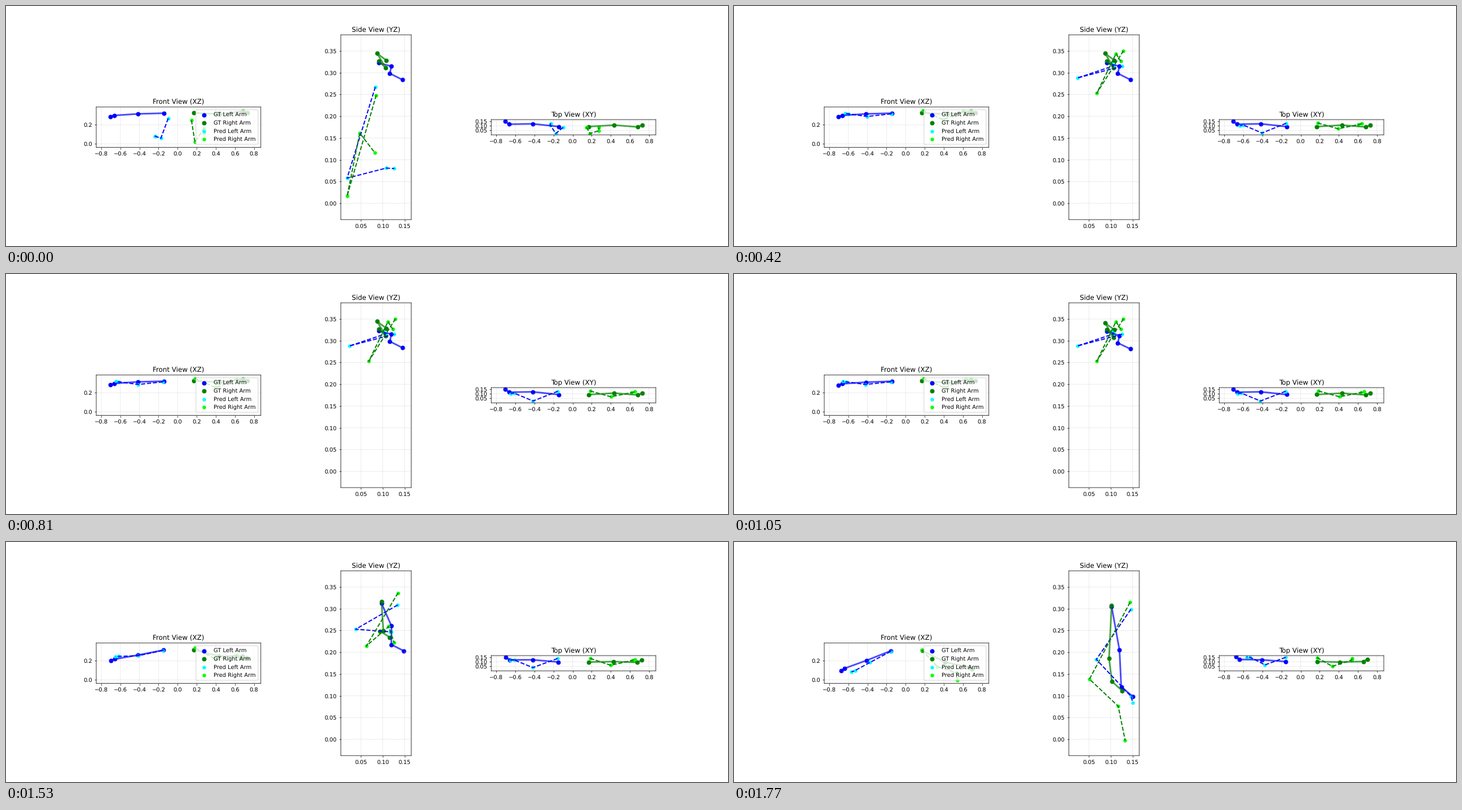
A matplotlib script that plays this animation: 1280 px wide and 427 px high, repeating every 1800 ms.

```python
import numpy as np
import matplotlib.pyplot as plt
from matplotlib.animation import FuncAnimation
from matplotlib.ticker import MultipleLocator

FRAMES, INTERVAL = 60, 30
DPI = 1280 / 18
SETTLE = 0.35   # share of the cold-start error left after each step
CREEP = 0.0018  # outward growth of the predicted reach per step
AXIS_LAG = np.array([1.75, 1, 1])  # an arm that swings down moves inward late

plt.rcParams.update({"path.snap": False, "text.hinting": "none"})


def pose(x, y, z):
    """Four joints, shoulder to hand, as rows of x, y, z."""
    return np.column_stack([x, y, z])


def drop(k, start, high, low, lag):
    """Speed up from the high pose at start to the low pose in the last frame."""
    u = np.clip((k - start) / (FRAMES - 1 - start), 0, 1)
    return high + (low - high) * u ** np.outer(lag, AXIS_LAG)


def measured(high, low):
    return lambda k: drop(k, 28, high, low, [2, 2.35, 2.65, 2.8])


def predicted(cold, high, low):
    def at(k):
        reach = 1 + CREEP * (min(k, 40) - 27)
        goal = drop(k, 40, high * [reach, 1, 1], low, [1.7, 2, 2.1, 2.1])
        return goal + (cold - goal) * SETTLE ** k
    return at


gt_left = measured(
    pose([-.146, -.418, -.667, -.707], [.091, .120, .116, .145], [.3223, .315, .2985, .284]),
    pose([-.155, -.408, -.640, -.677], [.102, .120, .124, .151], [.305, .205, .1203, .0983]))
gt_right = measured(
    pose([.170, .4365, .6855, .731], [.091, .1065, .087, .108], [.3264, .3116, .3445, .3287]),
    pose([.174, .412, .660, .698], [.102, .096, .1026, .1265], [.308, .1866, .1331, .1114]))
pred_left = predicted(
    pose([-.099, -.176, -.236, -.230], [.083, .0184, .108, .1265], [.2674, .058, .081, .080]),
    pose([-.155, -.415, -.614, -.649], [.126, .0235, .107, .101], [.315, .288, .316, .3215]),
    pose([-.157, -.373, -.530, -.567], [.146, .067, .147, .150], [.2987, .1836, .098, .0847]))
pred_right = predicted(
    pose([.145, .1815, .275, .275], [.085, .0184, .0473, .082], [.2484, .0167, .1616, .116]),
    pose([.1835, .403, .620, .655], [.129, .068, .112, .123], [.3505, .253, .344, .3262]),
    pose([.172, .332, .535, .540], [.144, .0513, .117, .133], [.3146, .1383, .0763, -.0025]))

SOLID = dict(lw=3, alpha=0.7)
DASHED = dict(lw=2, ls="--")

# label, path, dot colour, dot area, line colour, line style
ARMS = [
    ("GT Left Arm", gt_left, "blue", 50, "blue", SOLID),
    ("GT Right Arm", gt_right, "green", 50, "green", SOLID),
    ("Pred Left Arm", pred_left, "cyan", 30, "blue", DASHED),
    ("Pred Right Arm", pred_right, "lime", 30, "green", DASHED),
]
LIMITS = [(-0.8535, 0.8725), (0.0042, 0.1650), (-0.0373, 0.3872)]

# title, axes shown, tick steps
VIEWS = [
    ("Front View (XZ)", (0, 2), (0.2, 0.2)),
    ("Side View (YZ)", (1, 2), (0.05, 0.05)),
    ("Top View (XY)", (0, 1), (0.2, 0.05)),
]

fig, axes = plt.subplots(1, 3, figsize=(1280.01 / DPI, 427.01 / DPI), dpi=DPI)
parts = []
for ax, (title, (h, v), (xstep, ystep)) in zip(axes, VIEWS):
    ax.set(title=title, xlim=LIMITS[h], ylim=LIMITS[v], aspect="equal")
    ax.xaxis.set_major_locator(MultipleLocator(xstep))
    ax.yaxis.set_major_locator(MultipleLocator(ystep))
    ax.grid(True, alpha=0.3)
    for label, path, dot_color, size, line_color, style in ARMS:
        dots = ax.scatter([0] * 4, [0] * 4, c=dot_color, s=size, label=label)
        line, = ax.plot([], [], color=line_color, **style)
        parts.append((path, (h, v), dots, line))
axes[0].legend(loc="upper right")


def draw(k):
    for path, shown, dots, line in parts:
        points = path(k)[:, shown]
        dots.set_offsets(points)
        line.set_data(points[:, 0], points[:, 1])
    return []


anim = FuncAnimation(fig, draw, frames=FRAMES, interval=INTERVAL,
                     init_func=lambda: draw(0), repeat=True, repeat_delay=0)
plt.show()
```
